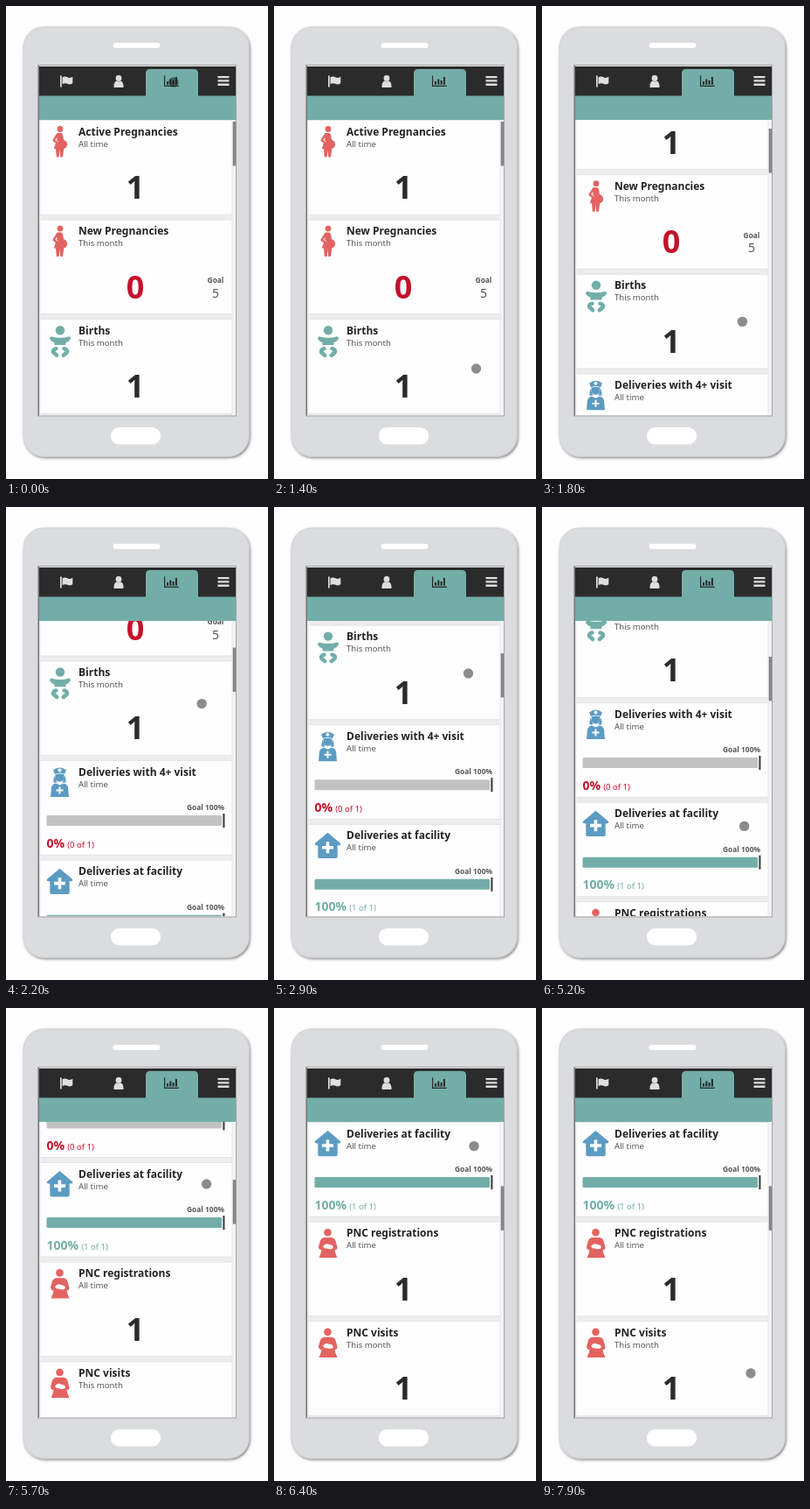
Write an HTML page that moves like this. It is 300 px wide and 540 px high and loops after 8 s.

```html
<!DOCTYPE html>
<html lang="en">
<head>
<meta charset="utf-8">
<title>Dashboard scroll</title>
<style>
html, body { margin: 0; width: 100%; height: 100%; overflow: hidden; background: #fefefe; }
svg { display: block; width: 300px; height: 540px; font-family: "Noto Sans", "Open Sans", sans-serif; }
.title { font-weight: 700; font-size: 12px; fill: #222; }
.small { font-size: 9.6px; fill: #555; }
.number { font-weight: 700; font-size: 36px; text-anchor: middle; }
.goal { font-weight: 700; font-size: 8.4px; fill: #555; }
.percent { font-weight: 700; font-size: 14px; }
</style>
</head>
<body>
<svg viewBox="0 0 300 540">
  <defs>
    <filter id="shadow" x="-10%" y="-10%" width="120%" height="120%">
      <feDropShadow dx="1.2" dy="1.5" stdDeviation="1.5" flood-color="#000" flood-opacity=".5"/>
    </filter>
    <clipPath id="view"><rect x="38" y="130" width="225" height="337"/></clipPath>
    <g id="pregnant" fill="#e36360">
      <circle cx="62" cy="10" r="3.4"/>
      <path d="M59 14.5h4q2 .5 2.3 3l.6 4.5q4.6 2 4.2 6-.4 3.500-3.800 4.300l-1.300 9.700h-2.800l-.6-8-1 8h-2.800l-.8-9.500h-2.200l2.600-8z"/>
      <path d="M59 16l-4.300 7 6 4" fill="none" stroke="#e36360" stroke-width="2.500" stroke-linejoin="round" stroke-linecap="round"/>
      <path d="M58.500 20.500l-1.300 2.300 2.500 1.600" fill="none" stroke="#fff" stroke-width=".9"/>
    </g>
    <g id="baby" fill="#72aea7">
      <circle cx="62" cy="12.500" r="5.200"/>
      <path d="M52 19.500q4 1.500 10 1.500t10-1.500q2.300.5 2 2.700-2 3.300-5.500 4.300v2.800h-13v-2.800q-3.500-1-5.500-4.300-.3-2.200 2-2.700z"/>
      <path d="M57.500 33.500q-4.500 1.500-3.300 4l4 3.500M66.500 33.500q4.500 1.500 3.300 4l-4 3.500" fill="none" stroke="#72aea7" stroke-width="4.500" stroke-linecap="round" stroke-linejoin="round"/>
    </g>
    <g id="nurse" fill="#5c9bc3">
      <path d="M54 11q7.500-6 15 0l-2 4.500q-5.500-2.500-11 0z"/>
      <path d="M56.500 16q5-2 10 0v3q-.5 5-5 5t-5-5z"/>
      <path d="M55.500 17q-1.500 5-1 8h4zM67.500 17q1.500 5 1 8h-4z"/>
      <path d="M51 41.500l1-11q1-4 5-4.500l4.500 2 4.500-2q4 .5 5 4.500l1 11z"/>
      <path d="M61.500 9v4M59.500 11h4M61.500 30v8M57.500 34h8" stroke="#fff" stroke-width="1.900"/>
    </g>
    <g id="house" fill="#5c9bc3">
      <path d="M61.500 9.500l14.700 12.300q.6 2-1.200 2.200h-2.300v13q0 1.800-1.800 1.800h-18.800q-1.800 0-1.800-1.800v-13h-2.300q-1.800-.2-1.200-2.200z"/>
      <path d="M61.500 20v13M55 26.500h13" stroke="#fff" stroke-width="3.600"/>
    </g>
    <g id="mother" fill="#e36360">
      <circle cx="61.500" cy="12.200" r="4.300"/>
      <path d="M57 18h9q3.500.5 4.500 4l2 7q.3 3-3 3.500l1 4 2 4.700h-21l2-4.700 1-4q-3.500-.5-3.500-4l2-7q1-3 4-3.500z"/>
      <path d="M56 28q3-4 6-2.500l5 1.500q2 3-1 4-4 .5-6-.8-2.500 1-4-2.200z" fill="#fff"/>
    </g>
  </defs>

  <rect width="300" height="540" fill="#fefefe"/>
  <rect x="20" y="24" width="258" height="490" rx="23" fill="#dbdcde" stroke="#d0d1d3" filter="url(#shadow)"/>
  <rect x="122.500" y="42" width="54" height="6" rx="3" fill="#fff"/>
  <rect x="120" y="481" width="57" height="19.500" rx="9.500" fill="#fff"/>

  <rect x="36.500" y="67.500" width="227" height="400.500" fill="#ededed" stroke="#a5a5a7"/>
  <g clip-path="url(#view)">
    <g id="cards"></g>
    <rect x="259.500" y="130" width="3.500" height="337" fill="#f4f4f4"/>
    <rect id="thumb" x="259.700" y="132" width="3.300" height="50.500" fill="#858585"/>
  </g>
  <rect x="37.500" y="69" width="225.500" height="34" fill="#2b2b2b"/>
  <path d="M37.500 102.500H160V77q0-5 5-5h50q5 0 5 5v25.500h43V130H37.500z" fill="#72aea7"/>
  <path d="M37.500 68v399.500" stroke="#777" stroke-width="1"/>

  <g fill="#dedede">
    <path d="M62 79.500h1.700v13H62zM64.500 81.500q3-2 6 0 2.500 1.200 5.800-.8v7.500q-3 2-6 .6-3-1.500-5.800.4z"/>
    <circle cx="129" cy="82.500" r="3.400"/>
    <path d="M123.500 93q-.5-6 3-7.500 2.500 1.600 5 0 3.500 1.500 3 7.500z"/>
    <path d="M242.500 80h13v2.300h-13zM242.500 84.300h13v2.300h-13zM242.500 88.600h13v2.300h-13z"/>
  </g>
  <path d="M181 79.500h1.200v11.300h15.600V92H181zM184 86h2v3.700h-2zM187.300 83.500h2v6.200h-2zM190.600 85h2v4.700h-2zM193.900 81h2v8.700h-2z" fill="#2b2b2b"/>
  <circle id="touch" r="5.700" fill="#1a1a1a" fill-opacity=".5"/>
</svg>
<script>
const RED = '#c4122b', TEAL = '#72aea7', DARK = '#2b2b2b';
const PITCH = 113.6, LOOP = 8000;
const byId = id => document.getElementById(id);
const text = (cls, x, y, s, extra = '') => `<text class="${cls}" x="${x}" y="${y}" ${extra}>${s}</text>`;

const count = (n, color = DARK) => text('number', 148, 89.5, n, `fill="${color}"`);
const goal = n => text('goal', 240, 72, 'Goal', 'text-anchor="middle"') +
  text('small', 240, 88.5, n, 'text-anchor="middle" style="font-size:14px"');
const progress = (value, note, color, bar) =>
  text('goal', 250, 56.5, 'Goal 100%', 'text-anchor="end"') +
  `<rect x="46.5" y="62.5" width="200.5" height="12" rx="1.5" fill="${bar}"/>
   <rect x="248.3" y="60.5" width="2.2" height="16" fill="#444"/>` +
  `<text x="46.5" y="99" fill="${color}"><tspan class="percent">${value}</tspan><tspan dx="3" font-size="9.6">${note}</tspan></text>`;

const cards = [
  ['pregnant', 'Active Pregnancies', 'All time', count(1)],
  ['pregnant', 'New Pregnancies', 'This month', count(0, RED) + goal(5)],
  ['baby', 'Births', 'This month', count(1)],
  ['nurse', 'Deliveries with 4+ visit', 'All time', progress('0%', '(0 of 1)', RED, '#c2c2c2')],
  ['house', 'Deliveries at facility', 'All time', progress('100%', '(1 of 1)', TEAL, TEAL)],
  ['mother', 'PNC registrations', 'All time', count(1)],
  ['mother', 'PNC visits', 'This month', count(1)]
];
byId('cards').innerHTML = cards.map(([icon, title, when, body], i) =>
  `<g transform="translate(0 ${130.5 + i * PITCH})">
    <rect x="39" y="0" width="220" height="107.6" fill="#fefefe" stroke="#e0e0e0" stroke-width=".8"/>
    <use href="#${icon}"/>${text('title', 83, 17, title)}${text('small', 83, 30, when)}${body}
  </g>`).join('');

// Keyframes: time, then values; smooth easing between them
const touchKeys = [[0, 192, 87], [300, 192, 87], [1300, 231.5, 414], [1500, 231.5, 414],
  [2465, 222.5, 182], [2900, 222.5, 190], [3100, 222.5, 190], [4300, 232, 390], [5000, 232, 390],
  [5982, 229, 154], [6500, 229, 158], [7800, 239, 417], [LOOP, 239, 417]];
const scrollKeys = [[0, 0], [1500, 0], [2465, 222.6], [5000, 222.6], [5982, 454.4], [LOOP, 454.4]];

function at(keys, t) {
  const i = keys.findIndex(k => k[0] > t), a = keys[i - 1], b = keys[i];
  const u = (t - a[0]) / (b[0] - a[0]), e = u * u * (3 - 2 * u);
  return a.slice(1).map((v, j) => v + (b[j + 1] - v) * e);
}

function draw(now) {
  const t = now % LOOP;
  const [scroll] = at(scrollKeys, t), [x, y] = at(touchKeys, t);
  byId('cards').setAttribute('transform', `translate(0 ${-scroll})`);
  byId('thumb').setAttribute('y', 132 + scroll * 0.157);
  byId('touch').setAttribute('transform', `translate(${x} ${y})`);
}

const start = performance.now();
function tick() {
  draw(performance.now() - start);
  requestAnimationFrame(tick);
}
tick();
</script>
</body>
</html>
```
